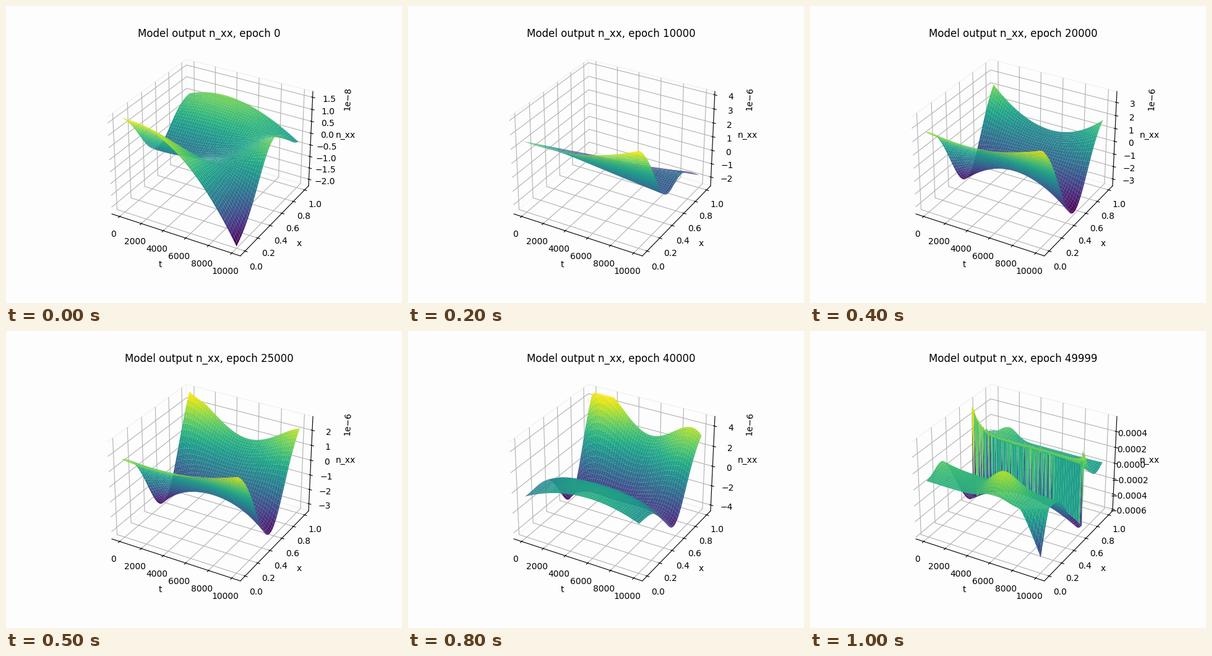
Recreate the animation shown at these times as a matplotlib script. Size 640 px wide and 480 px high, loop 1.1 s.

```python
import numpy as np
import matplotlib.pyplot as plt
from matplotlib.animation import FuncAnimation

N = 100
BG = "#fdfdfd"
X, T = np.meshgrid(np.linspace(0, 1, N), np.linspace(0, 1, N))


def curve(*keys):
    """Polynomial in t through evenly spaced key values."""
    n = len(keys)
    return np.polyval(np.polyfit(np.linspace(0, 1, n), keys, n - 1), T)


def bell(s, center, width):
    return np.exp(-((s - center) / width) ** 2)


def rescale(z, lo, hi):
    z = np.clip(z, 0, 1)
    return lo + (hi - lo) * (z - z.min()) / np.ptp(z)


def valley(lo, hi, left, right, depth, center, width, power=1):
    """Sheet between the edges x=0 and x=1 with a trough (or ridge) along t."""
    a, b = curve(*left), curve(*right)
    sheet = a + (b - a) * X ** power
    return rescale(sheet - curve(*depth) * bell(X, curve(*center), width), lo, hi)


def cliff(lo, hi):
    """Two sheets torn apart at x = 2/3, with a ragged wall between them."""
    u = np.clip((X - 0.22) / 0.43, 0, 1)
    u = u * u * (3 - 2 * u)
    floor = 0.22 - 0.22 * (2 * T - 1) ** 2 + 0.05 * T
    front = 0.59 + 0.09 * bell(X, 0.2, 0.12) * np.exp(-T / 0.2)
    front += 0.22 * bell(T, 0.6, 0.15) * bell(X, 0.14, 0.13)
    front -= 0.44 * np.clip(1 - (1 - T) / 0.18 - X / 0.12, 0, 1) ** 1.2
    front += (floor - front) * u

    v = np.clip((X - 2 / 3) * 3, 0, 1)
    top = 0.78 + 0.29 * np.exp(-T / 0.06) + 0.1 * np.exp(-(1 - T) / 0.04)
    back = 0.52 + (top - 0.52) * np.exp(-v / 0.38)
    back += 0.12 * bell(v, 0.9, 0.4) * bell(T, 0.15, 0.1)
    back -= 0.1 * np.sin(np.pi * v) * np.exp(-(1 - T) / 0.08)

    edge = 2 * N // 3
    z = np.where(np.arange(N) < edge, front, back)
    low = np.random.default_rng(4).random(N) < 0.75
    z[:, edge] = np.where(low, front[:, edge], back[:, edge])
    return rescale(z, lo, hi)


def mix(a, b, k=0.5):
    return a + (b - a) * k


e0 = valley(-2.21e-8, 1.66e-8, left=(1.03, 0.79, -0.026), right=(0.72, 0.78, 0.4),
            depth=(0.5, 0.34, -0.55), center=(0.47, 0.56), width=0.32)
e5 = valley(-1.053e-7, 1.482e-7, left=(-0.13, 0.12, 0.47, 0.565),
            right=(0.28, 0.17, 0.17), depth=(-0.95, -0.25, 0.3),
            center=(0.47, 0.38), width=0.34)
e10 = valley(-2.53e-6, 4.10e-6, left=(0.75, 0.79, 1.01), right=(0.01, 0.06, 0.13),
             depth=(0, 0.13, 0.36), center=(0.4,), width=0.22)
e20 = valley(-3.414e-6, 3.68e-6, left=(0.9, 0.86, 1.08), right=(0.96, 0.53, 0.85),
             depth=(0.93, 0.4, 0.95), center=(0.56, 0.52), width=0.33)
e30 = valley(-3.345e-6, 3.28e-6, left=(0.655, 0.67, 0.82),
             right=(1.23, 1.04, 0.81, 0.89, 1.02), depth=(0.85, 0.45, 0.78),
             center=(0.62, 0.54), width=0.33, power=2)
e40 = valley(-4.42e-6, 4.745e-6, left=(0.44, 0.62, 0.52),
             right=(1.05, 1.02, 0.75, 0.83, 0.86), depth=(0.68, 0.47, 0.5),
             center=(0.67, 0.58), width=0.24, power=2)
e50 = cliff(-5.98e-4, 5.61e-4)

surfaces = [e0, e5, e10, mix(e10, e20), e20, mix(e20, e30), e30,
            mix(e30, e40), e40, mix(e30, e40, 1.3), e50]

fig = plt.figure(figsize=(6.4, 4.8), dpi=100, facecolor=BG)
ax = fig.add_subplot(projection="3d", facecolor=BG)


def draw(i):
    ax.clear()
    for axis in (ax.xaxis, ax.yaxis, ax.zaxis):
        axis.set_pane_color(BG)
        axis.pane.set_edgecolor("#f1f1f1")
    ax.plot_surface(T * 10000, X, surfaces[i], cmap="viridis")
    ax.set(xlabel="t", ylabel="x", zlabel="n_xx")
    ax.set_title(f"Model output n_xx, epoch {min(i * 5000, 49999)}")
    return []


anim = FuncAnimation(fig, draw, frames=len(surfaces), init_func=lambda: [],
                     interval=100, repeat=True, repeat_delay=0)
plt.show()
```
